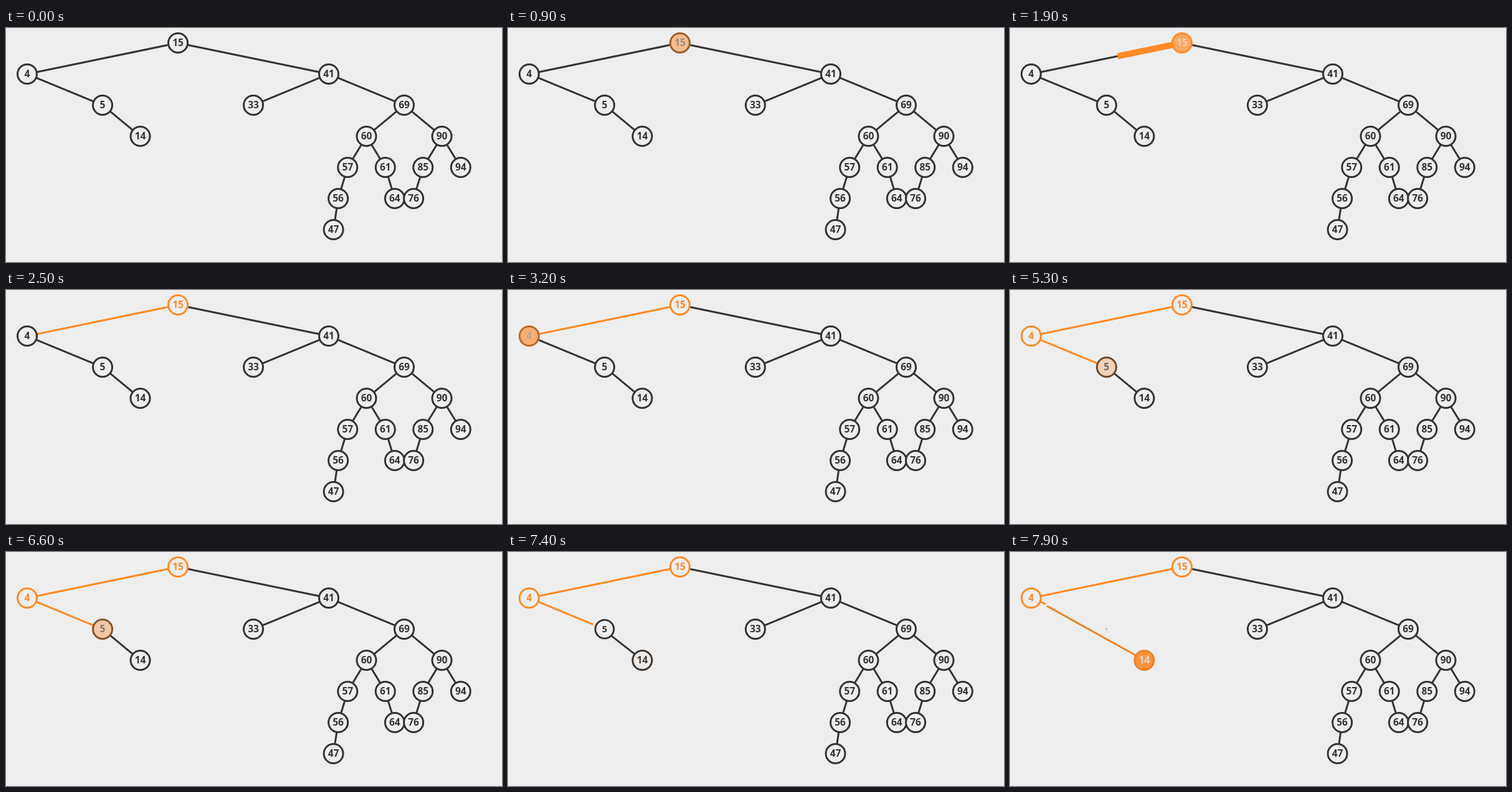
An HTML page for the animation above (8 s loop, 796 by 376 pixels).

```html
<!DOCTYPE html>
<html lang="en">
<head>
<meta charset="utf-8">
<title>Binary search tree: removing a vertex</title>
<style>
  html, body { margin: 0; width: 100%; height: 100%; overflow: hidden; background: #eee; }
  svg { display: block; }
  line { stroke-width: 3; }
  circle { stroke-width: 3; }
  text { font: 700 15.5px "Open Sans", "Noto Sans", sans-serif; text-anchor: middle; }
</style>
</head>
<body>
<svg id="stage" width="796" height="376" viewBox="0 0 796 376"></svg>
<script>
const LOOP = 8000, STEP = 100, SPAN = 1000, CUT = 16;
const DARK = [51, 51, 51], PALE = [238, 238, 238], HOT = [255, 138, 39];
const KEYS = [15, 4, 41, 5, 33, 69, 14, 60, 90, 57, 61, 85, 94, 56, 64, 76, 47];

// Each look is [stroke, fill, text]
const LOOKS = {
  plain: [DARK, PALE, DARK],
  active: [HOT, HOT, PALE],
  seen: [HOT, PALE, HOT]
};
// When each vertex starts to take on a new look
const CHANGES = {
  15: [[400, 'active'], [1480, 'seen']],
  4: [[2650, 'active'], [3800, 'seen']],
  5: [[4890, 'active'], [6060, 'plain']],
  14: [[7185, 'active']]
};
// When the edge leading to a vertex starts to be walked
const WALKS = { 4: 1430, 5: 3735 };
const WALK_WIDTH = 10, THIN_AT = 870, THIN_TIME = 200;
const REMOVE_AT = 7185;

const stage = document.getElementById('stage');
const clamp = x => Math.min(1, Math.max(0, x));
const mix = (a, b, p) => a + (b - a) * p;
const mixAll = (a, b, p) => a.map((v, i) => mix(v, b[i], p));
const rgb = c => `rgb(${c.map(Math.round)})`;
const ease = x => x < 0.5 ? 4 * x ** 3 : 1 - 4 * (1 - x) ** 3;
const progress = (t, start) => ease(clamp((t - start) / SPAN));

function add(parent, tag, attrs = {}) {
  const el = document.createElementNS('http://www.w3.org/2000/svg', tag);
  set(el, attrs);
  return parent.appendChild(el);
}
function set(el, attrs) {
  for (const name in attrs) el.setAttribute(name, attrs[name]);
}
function setLine(el, [x1, y1], [x2, y2], attrs) {
  set(el, { x1, y1, x2, y2, ...attrs });
}

// Ends of an edge, cut back to the rims of its two vertices
function span(a, b) {
  const dx = b.x - a.x, dy = b.y - a.y, k = CUT / Math.hypot(dx, dy);
  return [[a.x + dx * k, a.y + dy * k], [b.x - dx * k, b.y - dy * k]];
}

function buildTree() {
  const root = { key: KEYS[0], x: 276, y: 24 };
  const nodes = [root];
  for (const key of KEYS.slice(1)) {
    let at = root, gap = 242;
    for (;;) {
      const side = key < at.key ? 'left' : 'right';
      if (at[side]) {
        at = at[side];
        gap /= 2;
        continue;
      }
      const x = at.x + (side === 'left' ? -gap : gap);
      nodes.push(at[side] = { key, x, y: at.y + 50, parent: at });
      break;
    }
  }
  return nodes;
}

const nodes = buildTree();
const byKey = Object.fromEntries(nodes.map(n => [n.key, n]));
const edgeLayer = add(stage, 'g'), nodeLayer = add(stage, 'g');

for (const n of nodes) {
  if (n.parent) {
    n.ends = span(n.parent, n);
    n.edge = add(edgeLayer, 'line');
    setLine(n.edge, ...n.ends, { stroke: rgb(DARK) });
    if (WALKS[n.key]) n.walk = add(edgeLayer, 'line', { stroke: rgb(HOT) });
  }
  n.ring = add(nodeLayer, 'circle', { cx: n.x, cy: n.y, r: 15.5 });
  n.label = add(nodeLayer, 'text', { x: n.x, y: n.y + 5.4 });
  n.label.textContent = n.key;
  paint(n, LOOKS.plain);
}

function paint(n, [stroke, fill, text]) {
  set(n.ring, { stroke: rgb(stroke), fill: rgb(fill) });
  set(n.label, { fill: rgb(text) });
}

function lookAt(key, t) {
  let look = LOOKS.plain;
  for (const [start, name] of CHANGES[key]) {
    const p = progress(t, start);
    look = look.map((c, i) => mixAll(c, LOOKS[name][i], p));
  }
  return look;
}

function drawWalk(n, t, shrink) {
  const start = WALKS[n.key], [from, to] = n.ends;
  const p = progress(t, start);
  const tip = mixAll(from, to, p * (1 - shrink));
  const thin = clamp((t - start - THIN_AT) / THIN_TIME);
  setLine(n.walk, from, tip);
  n.walk.style.strokeWidth = mix(WALK_WIDTH, 3, thin);
  n.walk.style.display = p > 0 ? '' : 'none';
  setLine(n.edge, tip, to);
  n.edge.style.display = p < 0.999 ? '' : 'none';
}

function render(t) {
  for (const key in CHANGES) paint(byKey[key], lookAt(key, t));

  const gone = progress(t, REMOVE_AT);
  const old = byKey[5], kid = byKey[14];
  drawWalk(byKey[4], t, 0);
  drawWalk(old, t, gone);

  // The removed vertex shrinks while its child's edge moves up to the grandparent
  old.ring.setAttribute('r', 15.5 * (1 - gone));
  old.ring.style.strokeWidth = 3 * (1 - gone);
  old.label.style.fontSize = 15.5 * (1 - gone) + 'px';
  const goal = span(byKey[4], kid);
  setLine(kid.edge, mixAll(kid.ends[0], goal[0], gone), mixAll(kid.ends[1], goal[1], gone),
    { stroke: rgb(mixAll(DARK, HOT, gone)) });
}

const begin = performance.now();
function tick() {
  const t = (performance.now() - begin) % LOOP;
  render(Math.floor(t / STEP) * STEP);
  requestAnimationFrame(tick);
}
tick();
</script>
</body>
</html>
```
